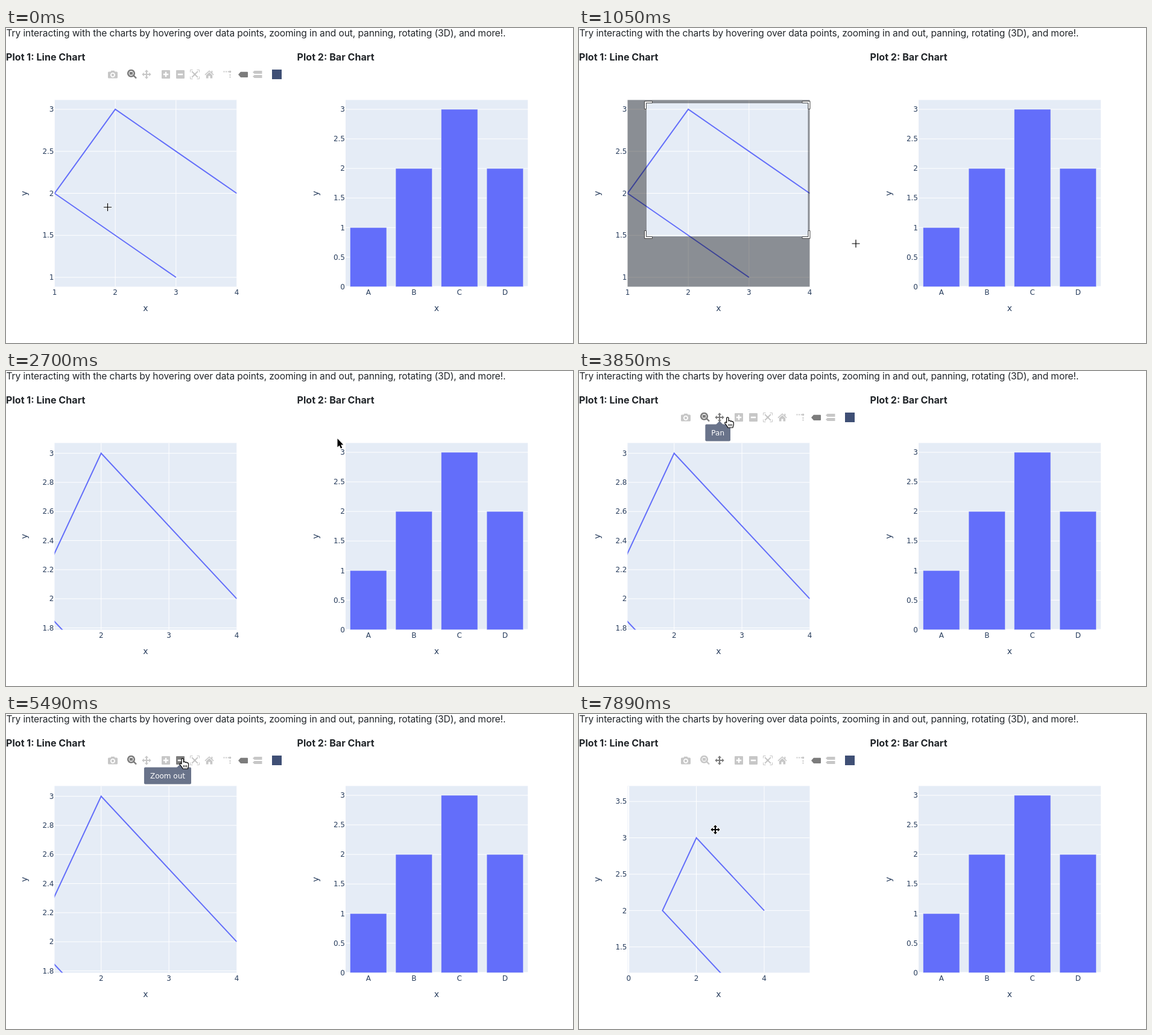
Animation, 940 px wide and 523 px high, one loop 8000 ms. Source, as an HTML page:

```html
<!DOCTYPE html>
<html lang="en">
<head>
<meta charset="utf-8">
<title>Interactive charts</title>
<style>
  html, body { margin: 0; width: 100%; height: 100%; overflow: hidden; background: #fff; }
  svg { display: block; width: 940px; height: 523px; }
  .intro, .heading { font-family: Inter, sans-serif; fill: #212529; }
  .intro { font-size: 15.6px; letter-spacing: -.12px; }
  .heading { font-size: 16.1px; font-weight: 700; }
  .tick, .title, .tip { font-family: "DejaVu Sans", sans-serif; font-size: 12px; fill: #2a3f5f; }
  .title { font-size: 14px; }
  .tip { fill: #fff; }
  .middle { text-anchor: middle; }
  .end { text-anchor: end; }
  .paper { fill: #e5ecf6; }
  .grid { stroke: #fff; fill: none; }
  .zero { stroke-width: 2; }
  .trace { stroke: #636efa; stroke-width: 2; fill: none; stroke-miterlimit: 2; }
  .bar { fill: #636efa; stroke: #e5ecf6; stroke-width: .5; }
  .shade { fill: rgba(0, 0, 0, .4); fill-rule: evenodd; }
  .corner { fill: #fff; stroke: #444; }
  .icon { color: #c7c7c7; fill: currentColor; fill-rule: evenodd; }
  .icon.on { color: #7c7c7c; }
  .line { fill: none; stroke: currentColor; }
  .tipbox { fill: #69738a; }
  .pointer { paint-order: stroke; stroke: #fff; stroke-width: 2; stroke-linejoin: round; }
  .hand { fill: #fff; stroke: #000; stroke-width: 1.2; stroke-linejoin: round; }
</style>
</head>
<body>
<svg viewBox="0 0 940 523">
  <defs>
    <clipPath id="area"><rect x="80.5" y="119.5" width="302" height="310"/></clipPath>
  </defs>
  <text class="intro" x=".5" y="13.5">Try interacting with the charts by hovering over data points, zooming in and out, panning, rotating (3D), and more!.</text>
  <text class="heading" x="0" y="53.5">Plot 1: Line Chart</text>
  <text class="heading" x="482.5" y="53.5">Plot 2: Bar Chart</text>
  <g id="bars"></g>
  <g id="scene"></g>
</svg>
<script>
const LOOP = 8000;
const LEFT = 80.5, TOP = 119.5, WIDTH = 302, HEIGHT = 310;
const RIGHT = LEFT + WIDTH, BOTTOM = TOP + HEIGHT, SHIFT = 482.5;
const POINTS = [[3, 1], [1, 2], [2, 3], [4, 2]];
const HOME = { x: [1, 4], y: [8 / 9, 28 / 9] };
const ZOOMED = { x: [1.313, 4], y: [1.7875, 3.0709] };
const DRAG_START = [112, 125];

// [time, x, y] of the mouse, linear in between
const PATH = [
  [0, 168.5, 297.5], [300, 112, 125], [450, 150, 165], [750, 300, 295], [900, 379.5, 346],
  [1050, 459, 358], [1500, 525, 304], [1650, 528, 303], [2100, 546, 224], [2400, 546, 224],
  [2700, 549, 111.5], [3000, 400, 97], [3400, 205, 107], [3550, 208, 77], [4000, 266, 77],
  [4740, 266, 77], [4890, 293, 74], [5790, 293, 74], [6390, 226, 83], [6840, 226, 83],
  [6990, 228, 104], [7140, 227, 81], [7440, 227, 81], [7890, 226, 192]
];
// [time, value], each holding until the next
const ZOOMS = [[0, 0], [1800, 1], [4450, .5], [4890, .25], [5190, .5], [5490, 1], [5790, 2]];
const POINTERS = [
  [0, 'cross'], [1650, 'arrow'], [3550, 'hand'], [6990, 'arrow'],
  [7140, 'hand'], [7590, 'arrow'], [7740, 'move']
];

const CROSS_ARROWS = 'M0-7.7 3.2-4.2H1.1V-1.1H4.2V-3.2L7.7 0 4.2 3.2V1.1H1.1V4.2H3.2L0 7.7-3.2 4.2H-1.1V1.1H-4.2V3.2L-7.7 0-4.2-3.2V-1.1H-1.1V-4.2H-3.2Z';
const BOX = 'M-6-7H6Q7-7 7-6V6Q7 7 6 7H-6Q-7 7-7 6V-6Q-7-7-6-7Z';
const path = (d, cls = '', style = '') => `<path class="${cls}" d="${d}" style="${style}"/>`;

const TOOLS = [
  { x: 177, art: path('M-6.5-4.5H-3.6L-2.6-6.2H2.6L3.6-4.5H6.5Q8-4.5 8-3V5Q8 6.5 6.5 6.5H-6.5Q-8 6.5-8 5V-3Q-8-4.5-6.5-4.5ZM0-3A4 4 0 1 0 .01-3ZM0-1.2A2.2 2.2 0 1 1-.01-1.2Z') },
  { x: 209, name: 'Zoom', art: path('M-1.5-7A5.3 5.3 0 1 0-1.49-7M2.8 2.2 7 6.5', 'line', 'stroke-width:2.5') + path('M-4.2-4H1.2V.6H-4.2Z') },
  { x: 233, name: 'Pan', art: path(CROSS_ARROWS) },
  { x: 265, name: 'Zoom in', art: path(BOX + 'M-1.2-4.2H1.2V-1.2H4.2V1.2H1.2V4.2H-1.2V1.2H-4.2V-1.2H-1.2Z') },
  { x: 289, name: 'Zoom out', art: path(BOX + 'M-4.2-1.2H4.2V1.2H-4.2Z') },
  { x: 313, art: path('M-7.5-3.5V-7.5H-3.5M3.5-7.5H7.5V-3.5M7.5 3.5V7.5H3.5M-3.5 7.5H-7.5V3.5', 'line') +
      path('M-5-5 5 5M5-5-5 5', 'line', 'stroke-width:1.8') + path('M-2-2H2V2H-2Z') },
  { x: 337, art: path('M0-6.8 7.6.2 6.6 1.4 0-4.7-6.6 1.4-7.6.2ZM0-3.4 5.2 1.4V6.5H1.5V2.5H-1.5V6.5H-5.2V1.4ZM3.4-6H5.3V-2L3.4-3.8Z') },
  { x: 367, art: path('M-6.5-4.5H3M4.5 0V7', 'line', 'stroke-width:2;stroke-dasharray:2 1.6') + path('M4.5-6.3A1.8 1.8 0 1 0 4.51-6.3Z') },
  { x: 393, art: path('M-8 .3-4-4.3H7Q8-4.3 8-3.3V4Q8 5 7 5H-4Z') },
  { x: 417, art: path('M-8-3.4-5.2-6H7.5V-.9H-5.2ZM-8 3.6-5.2 1H7.5V6.1H-5.2Z') }
];

const text = (cls, x, y, s) => `<text class="${cls}" x="${x}" y="${y}">${s}</text>`;
const held = (list, t) => list.filter(([start]) => start <= t).pop()[1];

function mouseAt(t) {
  const i = PATH.findIndex(p => p[0] > t);
  if (i < 0) return PATH[PATH.length - 1].slice(1);
  const [a, b] = [PATH[i - 1], PATH[i]];
  const k = (t - a[0]) / (b[0] - a[0]);
  return [a[1] + (b[1] - a[1]) * k, a[2] + (b[2] - a[2]) * k];
}

function snap(t) {
  const base = t < 3400 ? 0 : t < 4900 ? 3400 : 4890;
  return base + Math.floor((t - base) / 150) * 150;
}

function viewAt(t) {
  const k = held(ZOOMS, t);
  if (!k) return HOME;
  const scale = ([lo, hi]) => {
    const mid = (lo + hi) / 2, half = (hi - lo) / 2 * k;
    return [mid - half, mid + half];
  };
  return { x: scale(ZOOMED.x), y: scale(ZOOMED.y) };
}

function stepFor([lo, hi], count) {
  const rough = (hi - lo) / count, power = 10 ** Math.floor(Math.log10(rough));
  return [1, 2, 5, 10].find(m => m * power >= rough) * power;
}

function ticks([lo, hi], step) {
  const out = [];
  for (let i = Math.ceil(lo / step - 1e-6); i * step <= hi + 1e-6; i++) out.push(+(i * step).toFixed(4));
  return out;
}

const titles = (left, yTitle) =>
  text('title middle', left + WIDTH / 2, 469.7, 'x') +
  `<text class="title middle" transform="translate(${yTitle} 274.5) rotate(-90)">y</text>`;
const paper = left => `<rect class="paper" x="${left}" y="${TOP}" width="${WIDTH}" height="${HEIGHT}"/>`;
const gridLine = (d, v) => path(d, v ? 'grid' : 'grid zero');
const yLabel = (left, y, v) => text('tick end', left - 1, y + 4.2, v);
const xLabel = (x, v) => text('tick middle', x, 442.5, v);

function barChart() {
  const left = LEFT + SHIFT, unit = HEIGHT * .95 / 3, slot = WIDTH / 4;
  let out = paper(left);
  for (const v of ticks([0, 3], .5)) {
    const y = BOTTOM - v * unit;
    out += gridLine(`M${left} ${y}h${WIDTH}`, v) + yLabel(left, y, v);
  }
  [1, 2, 3, 2].forEach((v, i) => {
    const mid = left + slot * (i + .5);
    out += `<rect class="bar" x="${mid - slot * .4}" y="${BOTTOM - v * unit}" width="${slot * .8}" height="${v * unit}"/>`;
    out += xLabel(mid, 'ABCD'[i]);
  });
  return out + titles(left, 517.5);
}

function lineChart({ x, y }) {
  const px = v => LEFT + (v - x[0]) / (x[1] - x[0]) * WIDTH;
  const py = v => BOTTOM - (v - y[0]) / (y[1] - y[0]) * HEIGHT;
  const yStep = stepFor(y, 7.75);
  let grid = '', labels = '';
  for (const v of ticks(x, stepFor(x, 3.8))) {
    grid += gridLine(`M${px(v)} ${TOP}v${HEIGHT}`, v);
    labels += xLabel(px(v), v);
  }
  for (const v of ticks(y, yStep)) {
    grid += gridLine(`M${LEFT} ${py(v)}h${WIDTH}`, v);
    labels += yLabel(LEFT, py(v), v);
  }
  const trace = path('M' + POINTS.map(([a, b]) => `${px(a)} ${py(b)}`).join('L'), 'trace');
  return paper(LEFT) + `<g clip-path="url(#area)">${grid}${trace}</g>` + labels +
    titles(LEFT, yStep < .09 ? 27 : 35);
}

function zoomBox([mx, my]) {
  const [l, t] = DRAG_START, r = Math.min(mx, RIGHT), b = Math.min(my, BOTTOM);
  const corner = (x, y, sx, sy) =>
    `<path class="corner" d="M-3.5 9.5h3v-10h10v-3h-13Z" transform="translate(${x} ${y}) scale(${sx} ${sy})"/>`;
  return path(`M${LEFT} ${TOP}H${RIGHT}V${BOTTOM}H${LEFT}ZM${l} ${t}V${b}H${r}V${t}Z`, 'shade') +
    corner(l, t, 1, 1) + corner(r, t, -1, 1) + corner(r, b, -1, -1) + corner(l, b, 1, -1);
}

function toolbar(dx, mode, hovered) {
  const icons = TOOLS.map(tool => {
    const on = tool === hovered || tool.name === mode || tool.x === 393;
    return `<g class="icon${on ? ' on' : ''}" transform="translate(${tool.x} 77)">${tool.art}</g>`;
  }).join('');
  return `<g transform="translate(${dx} 0)">${icons}<rect x="441" y="69" width="16" height="16" fill="#3f4f75"/></g>`;
}

const tooltip = ({ x, name }) =>
  path(`M${x - 6} 89 ${x} 83 ${x + 6} 89Z`, 'tipbox') +
  `<rect id="tipbox" class="tipbox" y="88.5" height="28" rx="2"/>` +
  `<text id="tip" class="tip end" x="${x + 8}" y="107">${name}</text>`;

const POINTER_ART = {
  cross: path('M-6.5 0H6.5M0-6.5V6.5', '', 'stroke:#fff;stroke-width:2.4;opacity:.7') +
    path('M-6.5 0H6.5M0-6.5V6.5', '', 'stroke:#000;stroke-width:1.2'),
  arrow: path('M.5.8V15L3.7 12 6 17 8.3 16 6.1 11.1H10.3Z', 'pointer'),
  hand: path('M-2 1.5C-2-.6 1.4-.6 1.4 1.5V6C2 5 4.4 5.2 4.6 6.6 5.4 5.7 7.2 6 7.4 7.4 8.4 6.8 9.6 7.4 9.6 8.8V12C9.6 14 8.6 14.6 8.4 17H0C-.4 14.6-2.6 13-4.6 10.2-5.8 8.4-3.6 7-2 9Z', 'hand') +
    path('M1.6 11V14.5M4 11V14.5M6.4 11V14.5', '', 'stroke:#000'),
  move: path(CROSS_ARROWS, 'pointer')
};

function scene(t) {
  const mouse = mouseAt(t), kind = held(POINTERS, t);
  const hovered = kind === 'hand' && TOOLS.filter(tool => tool.name)
    .sort((a, b) => Math.abs(a.x - mouse[0]) - Math.abs(b.x - mouse[0]))[0];
  let out = lineChart(viewAt(t));
  if (t >= 600 && t < 1800) out += zoomBox(mouseAt(t - 150));
  if (hovered) out += tooltip(hovered);
  if (t < 600 || t >= 3000) out += toolbar(0, t < 7440 ? 'Zoom' : 'Pan', hovered);
  if (t >= 1800 && t < 2700) out += toolbar(SHIFT, 'Zoom');
  return out + `<g transform="translate(${mouse})">${POINTER_ART[kind]}</g>`;
}

const stage = document.getElementById('scene');
document.getElementById('bars').innerHTML = barChart();
let shown = -1;

function draw(now) {
  const t = snap(now % LOOP);
  if (t !== shown) {
    shown = t;
    stage.innerHTML = scene(t);
    const tip = document.getElementById('tip');
    if (tip) {
      const width = tip.getComputedTextLength() + 20, box = document.getElementById('tipbox');
      box.setAttribute('width', width);
      box.setAttribute('x', +tip.getAttribute('x') + 10 - width);
    }
  }
  requestAnimationFrame(draw);
}
draw(performance.now());
</script>
</body>
</html>
```
